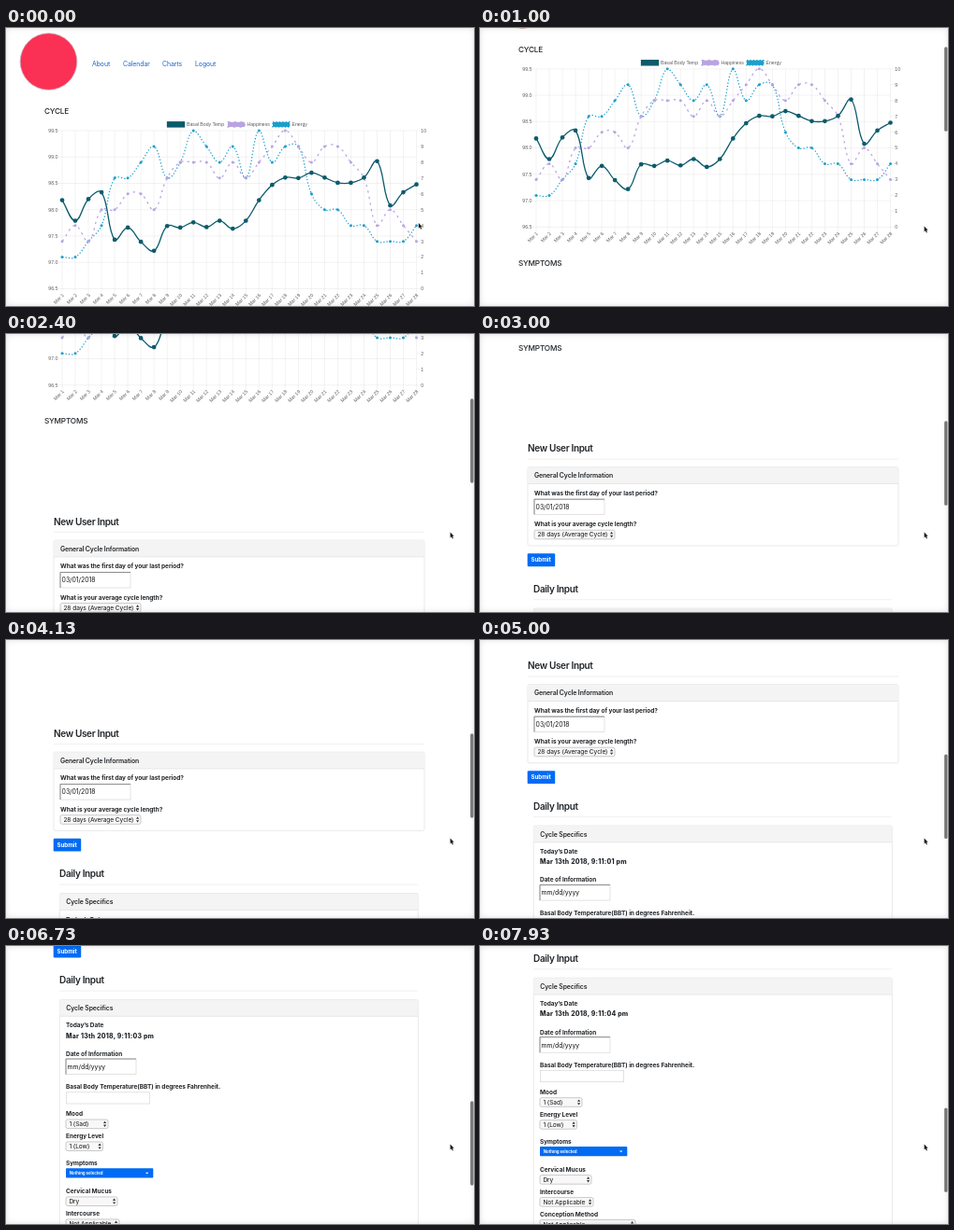
These frames come from a looping animation (500 px wide and 298 px high, 8 s). An HTML page:

```html
<!DOCTYPE html>
<html lang="en">
<head>
<meta charset="utf-8">
<title>Cycle tracker</title>
<style>
  html, body { margin: 0; width: 100%; height: 100%; overflow: hidden; background: #fff; }
  svg { display: block; position: absolute; left: 0; top: 0; }
  text { font-family: Inter, Roboto, sans-serif; font-size: 6.88px; fill: #212529; white-space: pre; }
  .nav { fill: #1a62cc; letter-spacing: -.06px; }
  .h3 { font-size: 10px; font-weight: 600; letter-spacing: -.34px; }
  .h5 { font-size: 8.2px; font-weight: 500; letter-spacing: -.2px; }
  .head { font-weight: 600; letter-spacing: -.1px; }
  .label { font-size: 6.5px; font-weight: 700; letter-spacing: -.05px; }
  .clock { font-weight: 800; letter-spacing: .24px; }
  .field { fill: #111; letter-spacing: -.04px; }
  .option { font-size: 6.6px; fill: #111; letter-spacing: -.06px; }
  .btn { font-size: 6.2px; font-weight: 700; fill: #fff; }
  .mini { font-size: 4.4px; font-weight: 700; fill: #fff; letter-spacing: -.05px; }
  .axis { font-family: "Liberation Sans", Arial, sans-serif; font-size: 5.17px; fill: #5c5c5c; }
  .edge { position: absolute; inset: 0; box-shadow: inset 0 0 6px rgba(0, 0, 0, .13); }
</style>
</head>
<body>
<svg id="stage" width="500" height="298" viewBox="0 0 500 298"></svg>
<div class="edge"></div>
<script>
const LOOP = 8000;
const stage = document.getElementById('stage');

function el(parent, tag, attrs) {
  const node = document.createElementNS('http://www.w3.org/2000/svg', tag);
  for (const key in attrs) node.setAttribute(key, attrs[key]);
  parent.appendChild(node);
  return node;
}

const page = el(stage, 'g', {});

// Text is placed by its left edge and vertical middle.
function text(x, y, str, cls, attrs = {}) {
  const node = el(page, 'text', { x, y, dy: '.36em', class: cls, ...attrs });
  node.textContent = str;
  return node;
}
const rect = (x, y, width, height, fill, attrs = {}) =>
  el(page, 'rect', { x, y, width, height, fill, ...attrs });
const path = (d, attrs) => el(page, 'path', { d, fill: 'none', ...attrs });

// ---- header ----
el(page, 'circle', { cx: 45.5, cy: 36, r: 30.3, fill: '#fb3055', stroke: '#c9a9b0', 'stroke-width': .8 });
[[92, 'About'], [125, 'Calendar'], [167, 'Charts'], [202, 'Logout']]
  .forEach(([x, name]) => text(x, 39, name, 'nav'));
text(41, 89, 'CYCLE', 'h5');

// ---- chart ----
const LEFT = 60, STEP = 14.02, TOP = 110, BOTTOM = 279.5, DAYS = 28;
const RIGHT = LEFT + STEP * (DAYS - 1);
const dayX = i => LEFT + i * STEP;
const scaleY = (v, min, max) => BOTTOM - (v - min) / (max - min) * (BOTTOM - TOP);

function drawGrid() {
  const grid = { stroke: '#000', 'stroke-opacity': .1, 'stroke-width': .5 };
  for (let i = 0; i < DAYS; i++) {
    const x = dayX(i);
    path(`M${x} ${TOP}V${BOTTOM + 4.3}`, grid);
    text(x + 1, 285.5, 'Mar ' + (i + 1), 'axis',
      { 'text-anchor': 'end', transform: `rotate(-45 ${x + 1} 285.5)` });
  }
  for (let v = 96.5; v <= 99.5; v += .5) {
    const y = scaleY(v, 96.5, 99.5);
    path(`M${LEFT - 4.3} ${y}H${RIGHT}`, grid);
    text(LEFT - 4.6, y, v.toFixed(1), 'axis', { 'text-anchor': 'end' });
  }
  for (let v = 0; v <= 10; v++) {
    const y = scaleY(v, 0, 10);
    path(`M${RIGHT} ${y}h4.3`, grid);
    text(RIGHT + 4.8, y, v, 'axis');
  }
}

// Cardinal spline, with control points held inside the plot.
function spline(pts, tension = .4) {
  const cap = y => Math.min(BOTTOM, Math.max(TOP, y));
  const dist = (a, b) => Math.hypot(b[0] - a[0], b[1] - a[1]);
  const handles = pts.map((p, i) => {
    const a = pts[i - 1] || p, b = pts[i + 1] || p;
    const d0 = dist(a, p), d1 = dist(p, b);
    const k0 = tension * d0 / (d0 + d1), k1 = tension * d1 / (d0 + d1);
    const dx = b[0] - a[0], dy = b[1] - a[1];
    return [p[0] - k0 * dx, cap(p[1] - k0 * dy), p[0] + k1 * dx, cap(p[1] + k1 * dy)];
  });
  return 'M' + pts[0] + pts.slice(1).map((p, i) =>
    `C${handles[i].slice(2)} ${handles[i + 1].slice(0, 2)} ${p}`).join('');
}

function drawSeries({ name, values, min, max, color, width, dash, r, legendX }) {
  const pts = values.map((v, i) => [dayX(i), scaleY(v, min, max)]);
  const line = { stroke: color, 'stroke-width': width, 'stroke-dasharray': dash };
  path(spline(pts), line);
  pts.forEach(([cx, cy]) => el(page, 'circle', { cx, cy, r, fill: color }));
  rect(legendX, 100.8, 18, 5.2, color, line);
  text(legendX + 20.5, 103.4, name, 'axis');
}

drawGrid();
drawSeries({
  name: 'Energy', legendX: 285, min: 0, max: 10, color: '#1c9fcd', width: 1.25, dash: '1.3 2.1', r: 1.5,
  values: [2, 2, 3, 4, 7, 7, 8, 9, 7, 8, 10, 9, 8, 9, 7, 10, 8, 9, 9, 6, 5, 5, 4, 4, 3, 3, 3, 4]
});
drawSeries({
  name: 'Happiness', legendX: 237, min: 0, max: 10, color: '#b9a3e3', width: 1.25, dash: '2.4 4.2', r: 1.5,
  values: [3, 4, 3, 5, 5, 6, 6, 5, 7, 8, 8, 8, 7, 8, 7, 8, 9, 10, 9, 8, 9, 9, 8, 7, 4, 5, 4, 3]
});
drawSeries({
  name: 'Basal Body Temp', legendX: 172.5, min: 96.5, max: 99.5, color: '#0c5b6c', width: 1.3, dash: 'none', r: 2.35,
  values: [98.18, 97.79, 98.2, 98.33, 97.43, 97.66, 97.39, 97.22, 97.69, 97.66, 97.76, 97.67, 97.79, 97.64,
    97.79, 98.18, 98.47, 98.61, 98.6, 98.7, 98.61, 98.51, 98.51, 98.61, 98.92, 98.08, 98.33, 98.48]
});
text(41, 318, 'SYMPTOMS', 'h5');

// ---- forms ----
function heading(x, y, right, str) {
  text(x, y, str, 'h3');
  path(`M${x} ${y + 11.5}H${right}`, { stroke: '#e6e6e6', 'stroke-width': .6 });
}

function card(x, y, w, h, title) {
  rect(x, y, w, h, '#fff', { rx: 1.7, stroke: '#dadada', 'stroke-width': .6 });
  rect(x + .3, y + .3, w - .6, 17.5, '#f4f4f4', { rx: 1.4 });
  path(`M${x} ${y + 17.8}h${w}`, { stroke: '#dadada', 'stroke-width': .6 });
  text(x + 7, y + 9.2, title, 'head');
}

function dateInput(x, y, value) {
  rect(x, y, 75, 16.5, '#fff', { stroke: '#d6d6d6', 'stroke-width': .7 });
  path(`M${x} ${y + 16.5}V${y}h75`, { stroke: '#808080', 'stroke-width': .9 });
  text(x + 1.6, y + 8.4, value, 'field');
}

function select(x, y, w, value) {
  rect(x, y, w, 9.6, '#f8f8f8', { rx: 1.8, stroke: '#b5b5b5', 'stroke-width': .7 });
  text(x + 3.4, y + 4.8, value, 'option');
  const a = x + w - 5, m = y + 4.8;
  path(`M${a} ${m - .7}l1.6 -2.4l1.6 2.4zM${a} ${m + .7}l1.6 2.4l1.6 -2.4z`, { fill: '#333' });
}

const BLUE = '#006bf4';
const label = (x, y, str) => text(x, y, str, 'label');

heading(51, 425.7, 447, 'New User Input');
card(51, 445.8, 396, 84.2, 'General Cycle Information');
label(58, 473.7, 'What was the first day of your last period?');
dateInput(58, 480.2, '03/01/2018');
label(58, 507.2, 'What is your average cycle length?');
select(58, 513.3, 86, '28 days (Average Cycle)');
rect(50.7, 538.4, 29.5, 13.8, BLUE, { rx: 1.2 });
text(54.4, 545.2, 'Submit', 'btn');

heading(57, 576.3, 440, 'Daily Input');
card(57.3, 597.2, 383, 330, 'Cycle Specifics');
label(64, 624.8, 'Today\u2019s Date');
const clock = text(64, 636, '', 'clock');
label(64, 655.2, 'Date of Information');
dateInput(64, 660.7, 'mm/dd/yyyy');
label(64, 690.4, 'Basal Body Temperature(BBT) in degrees Fahrenheit.');
rect(64.3, 696.5, 89.4, 12.2, '#fff', { stroke: '#d0d0d0', 'stroke-width': .6 });
label(64, 719.4, 'Mood');
select(64, 725.7, 45, '1 (Sad)');
label(64, 743.7, 'Energy Level');
select(64, 749.6, 39.5, '1 (Low)');
label(64, 772.2, 'Symptoms');
rect(64, 778, 93.3, 10.2, BLUE, { rx: .8 });
text(67.8, 783.2, 'Nothing selected', 'mini');
path('M149 782.4h3.4l-1.7 1.9z', { fill: '#fff' });
label(64, 802.7, 'Cervical Mucus');
select(64, 808.6, 55, 'Dry');
label(64, 826.8, 'Intercourse');
select(64, 832.6, 57, 'Not Applicable');
label(64, 850.8, 'Conception Method');
select(64, 856.4, 102, 'Not Applicable');

// ---- overlay ----
const bar = el(stage, 'rect', { x: 496.1, width: 3.4, height: 90.5, rx: 1.7, fill: '#7c7c7c' });
const cursor = el(stage, 'path', {
  d: 'M0 0V5.8L1.3 4.6L2.3 6.8L3.3 6.3L2.4 4.2H4.1Z',
  fill: '#1a1a1a', stroke: '#fff', 'stroke-width': .5, 'paint-order': 'stroke'
});

// ---- motion ----
const SCROLL = [
  [0, 0], [560, 0], [800, 32], [1000, 66], [1400, 109], [1800, 142], [2270, 206], [3000, 303],
  [3330, 319], [3400, 319], [3800, 321.5], [4000, 321.5], [4400, 346], [4870, 386], [5000, 398],
  [5530, 474], [5930, 507.7], [6470, 532], [7070, 545], [7330, 545], [7730, 563], [LOOP, 563]
];

// Monotone cubic through the scroll stops.
const slopes = SCROLL.slice(1).map(([t, y], i) => (y - SCROLL[i][1]) / (t - SCROLL[i][0]));
const tangents = SCROLL.map((_, i) => {
  const a = slopes[i - 1] || 0, b = slopes[i] || 0;
  return a * b > 0 ? 2 * a * b / (a + b) : 0;
});

function scrollAt(t) {
  const i = Math.max(0, SCROLL.findIndex(s => s[0] > t) - 1);
  const [t0, y0] = SCROLL[i], [t1, y1] = SCROLL[i + 1];
  const h = t1 - t0, u = (t - t0) / h, v = 1 - u;
  return y0 * (1 + 2 * u) * v * v + y1 * u * u * (3 - 2 * u)
    + h * u * v * (tangents[i] * v - tangents[i + 1] * u);
}

function render(t) {
  const y = scrollAt(t);
  page.setAttribute('transform', `translate(0 ${-y})`);
  bar.setAttribute('y', y * .308);
  bar.setAttribute('opacity', t < 590 ? 0 : 1);

  const p = Math.min(1, Math.max(0, (t - 40) / 290)), e = p * p * (3 - 2 * p);
  cursor.setAttribute('transform', `translate(${440.8 + 33.8 * e} ${209 + 3.6 * e})`);

  const sec = Math.max(0, Math.floor((t - 5470) / 1000) + 2);
  clock.textContent = `Mar 13th 2018, 9:11:0${sec} pm`;
}

const start = performance.now();
function tick() {
  render((performance.now() - start) % LOOP);
  requestAnimationFrame(tick);
}
tick();
</script>
</body>
</html>
```
